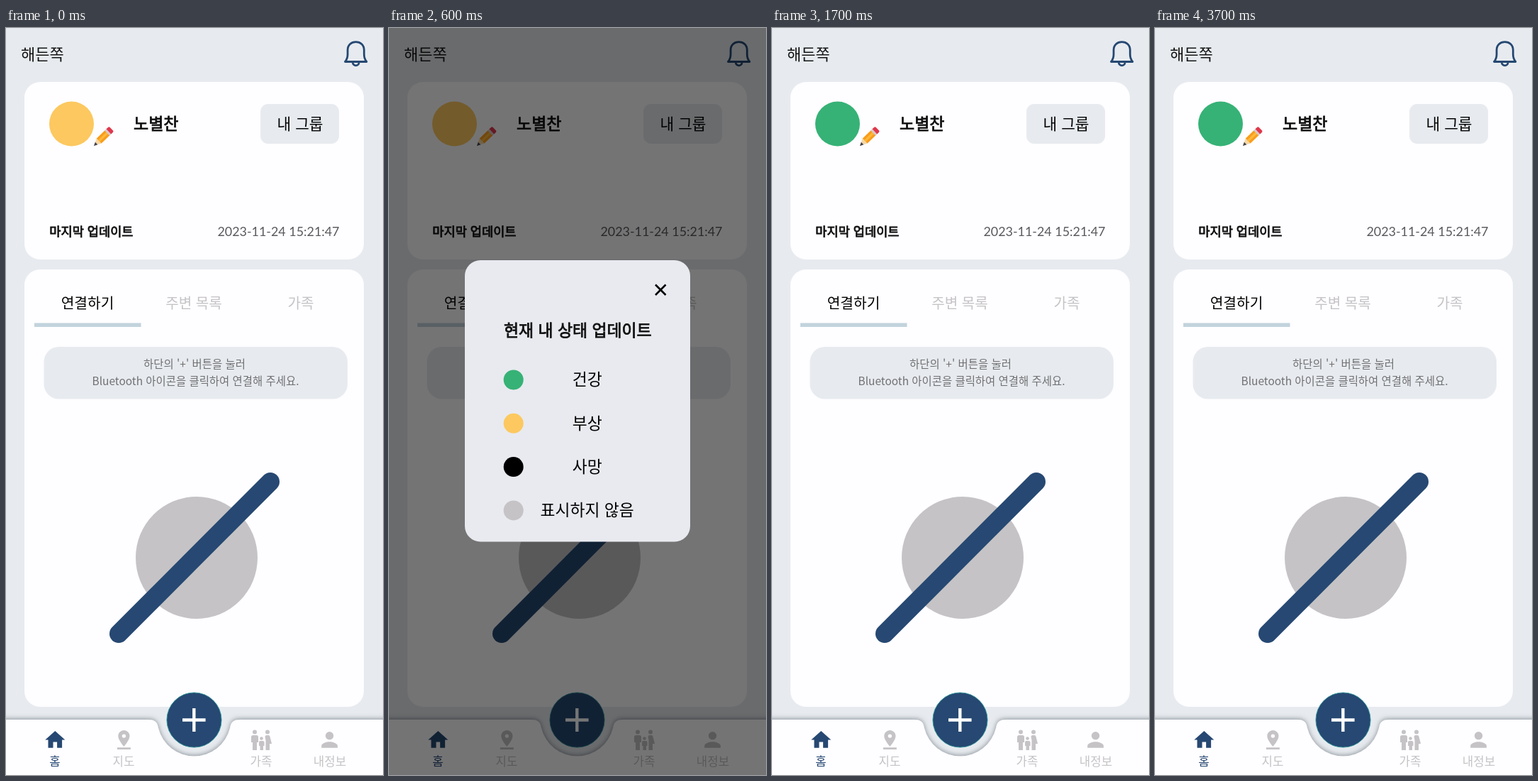
An HTML page that plays this animation: 532 by 1052 pixels, repeating every 4 s.

```html
<!DOCTYPE html>
<html lang="ko">
<head>
<meta charset="utf-8">
<title>상태 업데이트</title>
<style>
  html, body { margin: 0; width: 100%; height: 100%; overflow: hidden; background: #e7ebef; }
  svg { display: block; width: 532px; height: 1052px; }
  text { font-family: "Noto Sans CJK KR", "Noto Sans CJK", "Noto Sans", sans-serif; }
  .medium { stroke: #111; stroke-width: .8px; }
  .date { font-family: Lato, sans-serif; }
  .card { fill: #fefdff; }
  .soft { fill: #e7ebef; }
  .grey { fill: #c5c3c5; }
  .navy { fill: #264872; }
</style>
</head>
<body>
<svg viewBox="0 0 532 1052" xmlns="http://www.w3.org/2000/svg">
  <defs>
    <filter id="shade" x="-5%" y="-20%" width="110%" height="140%">
      <feDropShadow dx="0" dy="-1" stdDeviation="3.5" flood-color="#56606c" flood-opacity=".65"/>
    </filter>
  </defs>
  <rect width="532" height="1052" class="soft"/>

  <g fill="none" stroke="#264872" stroke-width="2.8" stroke-linejoin="round">
    <path d="M478.5 47.5H508.9C505.9 44 505.3 41.5 505.3 37V31C505.3 24 500.5 19.6 493.7 19.6S482.1 24 482.1 31V37C482.1 41.5 481.5 44 478.5 47.5Z"/>
    <path d="M489.3 48.5a4.4 4.4 0 0 0 8.8 0"/>
  </g>

  <rect x="26" y="76" width="479" height="250" rx="22" class="card"/>
  <circle id="status" cx="92.5" cy="135" r="31.5"/>
  <g transform="translate(124 166) rotate(-44)">
    <path d="M0 0L10-4.9V4.9Z" fill="#f6d7a4"/>
    <path d="M0 0L5-2.5V2.5Z" fill="#414454"/>
    <path d="M10-4.9H27V4.9H10Z" fill="#f99d1c"/>
    <path d="M10-1.6H27V1.6H10Z" fill="#fdb83b"/>
    <path d="M26-4.9H29V4.9H26Z" fill="#d8c8cc"/>
    <path d="M29-4.9H32.5Q34.5-4.9 34.5-3V3Q34.5 4.9 32.5 4.9H29Z" fill="#e0384b"/>
  </g>
  <rect x="359" y="107" width="111" height="56" rx="11" class="soft"/>

  <rect x="26" y="340" width="479" height="616" rx="22" class="card"/>
  <rect x="40" y="415.5" width="150.5" height="5.5" fill="#c2d3dc"/>
  <rect x="53.5" y="449" width="428.5" height="73.5" rx="21" class="soft"/>
  <circle cx="269" cy="746" r="86" class="grey"/>
  <path d="M159 853L373 639" stroke="#264872" stroke-width="26" stroke-linecap="round"/>

  <path d="M-10 974H200C210 974 213.5 977 215 986A52 52 0 0 0 316 986C317.5 977 321 974 331 974H542V1062H-10Z" class="card" filter="url(#shade)"/>
  <circle cx="265.5" cy="974.5" r="38.6" class="navy" stroke="#2b9a9b" stroke-width=".8"/>
  <path d="M249 974.5H281.6M265.3 958V991" stroke="#fff" stroke-width="4.4"/>
  <path class="navy" transform="translate(52.5 985.8) scale(1.4)" d="M10 20v-6h4v6h5v-8h3L12 3 2 12h3v8z"/>
  <g class="grey">
    <path transform="translate(150.2 986.3) scale(1.35)" d="M18 8c0-3.31-2.69-6-6-6S6 4.71 6 8c0 4.5 6 11 6 11s6-6.5 6-11zM10 8a2 2 0 0 1 4 0 2 2 0 0 1-4 0zM5 20v2h14v-2z" fill-rule="evenodd"/>
    <path transform="translate(439.5 985.3) scale(1.42)" d="M12 12a4 4 0 1 0 0-8 4 4 0 0 0 0 8zm0 2c-2.67 0-8 1.34-8 4v2h16v-2c0-2.66-5.33-4-8-4z"/>
    <circle cx="351" cy="991.5" r="3"/>
    <path d="M348.5 996H353.5Q356 996 356 998.5V1006H354V1017H348V1006H346V998.5Q346 996 348.5 996Z"/>
    <circle cx="369" cy="991.5" r="3"/>
    <path d="M367.5 996H370.5Q372 996 372.5 998L375 1008H372V1017H366.5V1003L365.5 998Q366 996 367.5 996Z"/>
    <circle cx="360.5" cy="1000.5" r="2.3"/>
    <path d="M358.5 1004H362.5Q364.5 1004 364.5 1006V1011H363V1017H358.5V1011H357V1006Q357 1004 358.5 1004Z"/>
  </g>
  <g id="labels"></g>

  <rect id="dim" width="532" height="1052"/>
  <g id="dialog">
    <rect x="107" y="327" width="318" height="396.5" rx="22" fill="#e8eaef"/>
    <path d="M376 361.5L390.5 376M390.5 361.5L376 376" stroke="#000" stroke-width="2.6"/>
  </g>
  <circle id="touch" cx="275" cy="502" r="16" fill="#f5f6f9" fill-opacity=".78" stroke="#b9bfc8" stroke-opacity=".75" stroke-width="1.5"/>
</svg>
<script>
const $ = id => document.getElementById(id);
const labels = $('labels'), dialog = $('dialog');

function add(parent, tag, attrs, text = '') {
  const el = document.createElementNS('http://www.w3.org/2000/svg', tag);
  for (const k in attrs) el.setAttribute(k, attrs[k]);
  el.textContent = text;
  parent.append(el);
}

// Place text by its vertical middle.
function label(parent, text, x, mid, size, fill = '#000', anchor = 'middle', cls = '') {
  add(parent, 'text', {
    x, y: mid + size * .35, 'font-size': size, fill, 'text-anchor': anchor, class: cls
  }, text);
}

const navy = '#264872', pale = '#c5c3c5', mute = '#717073';
const amber = '#fcc85f', green = '#36b276';

label(labels, '해든쪽', 21, 37, 22, '#111', 'start');
label(labels, '노별찬', 180, 135, 23, '#111', 'start', 'medium');
label(labels, '내 그룹', 415, 136, 21.4);
label(labels, '마지막 업데이트', 61.3, 287, 17.6, '#111', 'start', 'medium');
label(labels, '2023-11-24 15:21:47', 470.5, 287, 17.9, '#59585c', 'end', 'date');
label(labels, '연결하기', 115, 388, 20.3);
label(labels, '주변 목록', 265, 388, 20.1, pale);
label(labels, '가족', 416, 388, 20.1, pale);
label(labels, "하단의 '+' 버튼을 눌러", 266, 474, 15.45, mute);
label(labels, 'Bluetooth 아이콘을 클릭하여 연결해 주세요.', 267.5, 498, 15.45, mute);
[['홈', 69, navy], ['지도', 166, pale], ['가족', 360, pale], ['내정보', 457, pale]]
  .forEach(([text, x, fill]) => label(labels, text, x, 1033, 16.8, fill));

label(dialog, '현재 내 상태 업데이트', 266.3, 426, 22.9, '#111', 'middle', 'medium');
[['건강', green], ['부상', amber], ['사망', '#000'], ['표시하지 않음', pale]]
  .forEach(([text, fill], i) => {
    const y = 495.5 + i * 61.3;
    add(dialog, 'circle', { cx: 175.7, cy: y, r: 14, fill });
    label(dialog, text, 279.7, y, 22.8);
  });

// time, dim, dialog opacity, dialog shift, touch opacity, status colour
const steps = [
  [0, 0, 0, 0, 0, amber],
  [500, .28, .84, 4.5, 0, amber],
  [600, .54, 1, 0, 0, amber],
  [700, .6, 1, 0, 0, amber],
  [1400, .6, 1, 0, 1, amber],
  [1600, .3, .5, 0, 0, green],
  [1700, 0, 0, 0, 0, green]
];

function draw() {
  const t = performance.now() % 4000;
  const [, dim, alpha, shift, touch, colour] = steps.findLast(s => s[0] <= t);
  $('dim').setAttribute('opacity', dim);
  dialog.setAttribute('opacity', alpha);
  dialog.setAttribute('transform', `translate(0 ${shift})`);
  $('touch').setAttribute('opacity', touch);
  $('status').setAttribute('fill', colour);
  requestAnimationFrame(draw);
}
draw();
</script>
</body>
</html>
```
